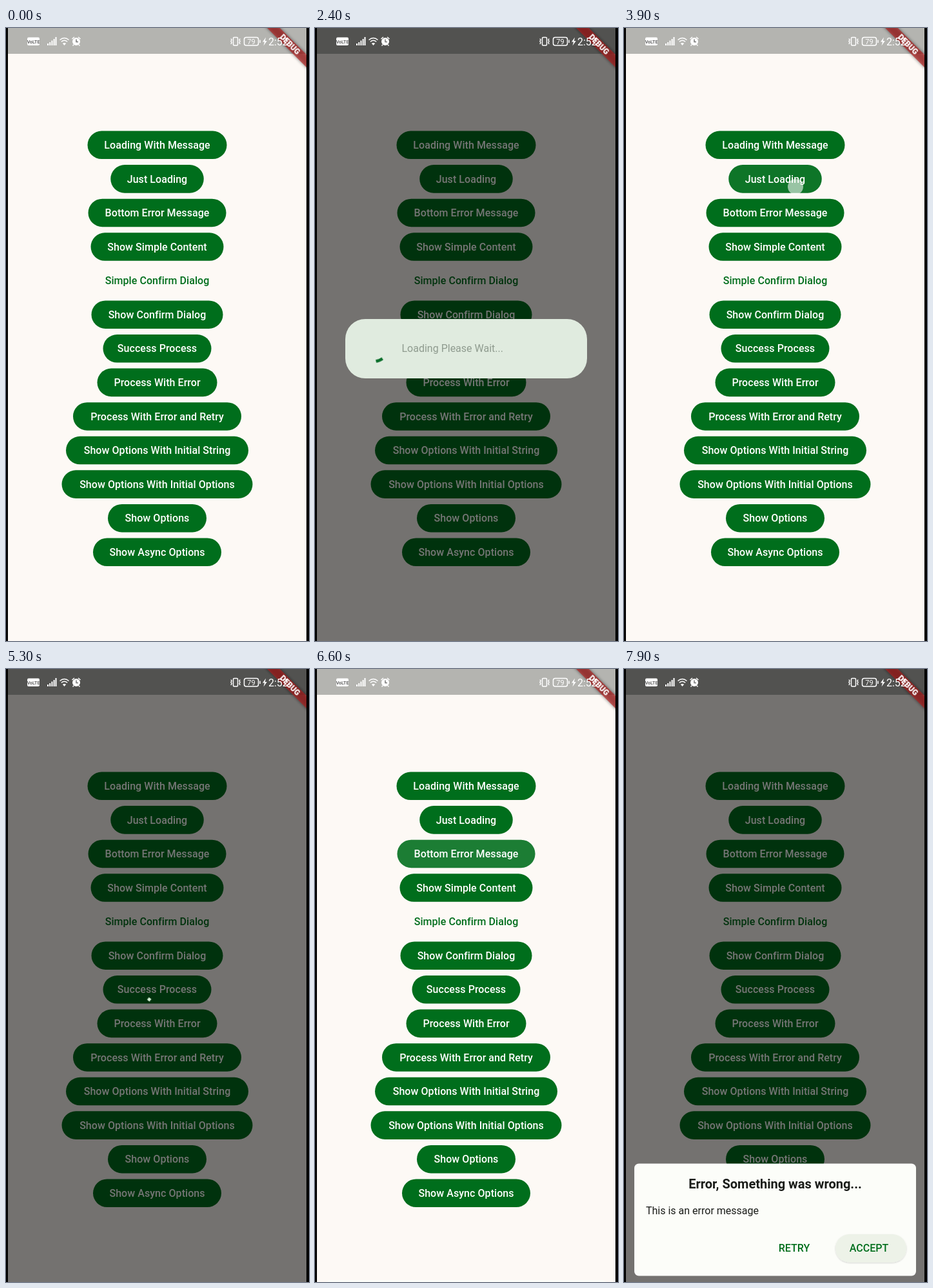
An HTML page that plays this animation: 470x950 px, repeating every 8 s.

```html
<!DOCTYPE html>
<html lang="en">
<head>
<meta charset="utf-8">
<title>Dialog demo</title>
<style>
  html, body { margin: 0; width: 100%; height: 100%; overflow: hidden; background: #000; }
  svg { display: block; width: 470px; height: 950px; }
  text { font: 400 16px Roboto, "Noto Sans", sans-serif; white-space: pre; }
  .mid { text-anchor: middle; }
  .label { font-weight: 500; letter-spacing: .05px; }
  .green { fill: #006e1c; }
  .white { fill: #fff; }
  .line { fill: none; stroke: #fff; stroke-width: 1.5; }
  .dark { stroke: #777; }

  /* Every part runs on an 8 s loop, shifted by its own start time --t. */
  .run { animation: 8s linear var(--t) infinite; }
  .scrim, .dialog, .sheet, .sheet-scrim, .touch, .ripple { opacity: 0; }
  .scrim { animation-name: scrim; }
  .dialog { animation-name: dialog; }
  .sheet { animation-name: sheet; }
  .sheet-scrim { animation-name: sheet-scrim; }
  .touch { animation-name: touch; }
  .ripple { animation-name: ripple; }
  .first { --t: 1280ms; }
  .second { --t: 3955ms; }
  .third { --t: 6600ms; }

  .spinner {
    fill: none; stroke-width: 4.7; stroke-linecap: square;
    stroke-dasharray: .1 360;
    transform-origin: 0 0;
    animation:
      spin 8s linear var(--t) infinite,
      arc 8s cubic-bezier(.4, 0, .2, 1) var(--t) infinite;
  }

  @keyframes scrim {
    0% { opacity: 0; animation-timing-function: ease; }
    1.875%, 25.61% { opacity: 1; animation-timing-function: cubic-bezier(.75, 0, .75, .9); }
    27.49%, 100% { opacity: 0; }
  }
  @keyframes dialog {
    0% { opacity: 0; animation-timing-function: ease-out; }
    1.875%, 25.61% { opacity: 1; animation-timing-function: ease-in; }
    27.49%, 100% { opacity: 0; }
  }
  @keyframes sheet {
    0% { opacity: 1; transform: translateY(184px); animation-timing-function: cubic-bezier(0, 0, .2, 1); }
    3.125%, 17.499% { opacity: 1; transform: translateY(0); }
    17.5%, 100% { opacity: 0; transform: translateY(0); }
  }
  @keyframes sheet-scrim {
    0% { opacity: 0; animation-timing-function: ease; }
    3.125%, 17.499% { opacity: 1; }
    17.5%, 100% { opacity: 0; }
  }
  @keyframes touch {
    0%, 1.3% { opacity: .58; }
    1.31%, 100% { opacity: 0; }
  }
  @keyframes ripple {
    0% { opacity: 0; }
    2%, 4.2% { opacity: .15; }
    6.5%, 100% { opacity: 0; }
  }
  @keyframes spin {
    from { rotate: 0deg; }
    to { rotate: 1836.26deg; }
  }
  /* The head runs ahead by 270 degrees, then the tail catches up. */
  @keyframes arc {
    0% { stroke-dasharray: .1 360; transform: rotate(-90deg); }
    8.331% { stroke-dasharray: 270 360; transform: rotate(-90deg); }
    16.6625% { stroke-dasharray: .1 360; transform: rotate(180deg); }
    24.994% { stroke-dasharray: 270 360; transform: rotate(180deg); }
    33.325%, 100% { stroke-dasharray: .1 360; transform: rotate(450deg); }
  }
</style>
</head>
<body>
<svg viewBox="0 0 470 950">
  <defs>
    <clipPath id="screen"><rect x="3" width="463" height="950"/></clipPath>
    <filter id="soft" x="-20%" y="-60%" width="140%" height="220%">
      <feDropShadow dx="0" dy="1" stdDeviation="1.2" flood-opacity=".18"/>
    </filter>
    <filter id="blur" x="-20%" y="-100%" width="140%" height="300%">
      <feGaussianBlur stdDeviation="2.5"/>
    </filter>
  </defs>

  <rect width="470" height="950"/>
  <g clip-path="url(#screen)">
    <rect width="470" height="950" fill="#fdf9f5"/>
    <rect width="470" height="40" fill="#b4b4b0"/>
    <g id="buttons"></g>

    <rect class="run scrim first" width="470" height="950" fill-opacity=".54"/>
    <g class="run dialog first">
      <rect x="47" y="451" width="375" height="92" rx="31" fill="#e0ebdf"/>
      <g transform="translate(92.5 497)">
        <circle class="spinner" r="19.5" pathLength="360" stroke="#0b6f2b"/>
      </g>
      <text x="134.5" y="502" fill="#8f9b8f">Loading Please Wait...</text>
    </g>

    <rect class="run scrim second" width="470" height="950" fill-opacity=".54"/>
    <g class="run dialog second">
      <g transform="translate(234.5 497)">
        <circle class="spinner" r="19.5" pathLength="360" stroke="#d8f3d8"/>
      </g>
    </g>

    <rect class="run sheet-scrim third" width="470" height="950" fill-opacity=".54"/>
    <g class="run sheet third">
      <rect x="16" y="766.5" width="437" height="174" rx="7" fill="#fcfdf9"/>
      <text class="mid" x="234.5" y="804.5" fill="#1a1c19" style="font-size:20px;font-weight:700">Error, Something was wrong...</text>
      <text x="34" y="845" fill="#1a1c19">This is an error message</text>
      <text class="mid label green" x="264" y="903">RETRY</text>
      <rect x="328" y="876" width="110" height="43.5" rx="21.75" fill="#edf2e8" filter="url(#soft)"/>
      <text class="mid label green" x="380" y="903">ACCEPT</text>
    </g>

    <g transform="translate(440.5 25.5) rotate(45)">
      <rect x="-60" y="-7" width="120" height="14" fill-opacity=".5" filter="url(#blur)"/>
      <rect x="-60" y="-7" width="120" height="14" fill="#b71c1c" fill-opacity=".63"/>
      <text class="mid white" y="4.3" style="font-size:12px;font-weight:900">DEBUG</text>
    </g>

    <g id="status">
      <rect class="white" x="33" y="14.5" width="19" height="12.5" rx="2"/>
      <text class="mid" x="42.5" y="23.8" fill="#666" style="font-size:7px;font-weight:700">VoLTE</text>
      <path class="line" style="stroke-width:2" d="M65 27v-3M68.2 27v-5M71.4 27v-7.5M74.6 27v-10M77.5 27v-13"/>
      <path class="line" d="M83.5 18.5q7-6 14 0M85.800 21.300q4.700-4 9.400 0"/>
      <path class="white" d="M90.5 27l-2.700-3.200q2.700-1.800 5.400 0z"/>
      <circle class="white" cx="109" cy="21" r="6"/>
      <path class="line" d="M102.500 17l3.500-3M115.500 17l-3.500-3M105 26l-1.500 1.500M113 26l1.500 1.500"/>
      <path class="line dark" d="M109 17.500v4h3"/>
      <rect class="line" x="352.500" y="14.500" width="7" height="12.500" rx="1.500"/>
      <path class="line" d="M349 16.500l1 2-1 2 1 2-1 2.500M363 16.500l-1 2 1 2-1 2 1 2.500"/>
      <rect class="line" x="369.500" y="14.500" width="22" height="12.500" rx="3"/>
      <path class="line" d="M394 18.500v4.500"/>
      <text class="mid white" x="380.500" y="25" style="font-size:11px">79</text>
      <path class="white" d="M403 14.500l-5 7h3l-1.500 6 5.300-7.500h-3z"/>
      <text class="white" x="407" y="26.500">2:52</text>
    </g>

    <circle class="run touch" style="--t:1175ms" cx="266" cy="192" r="12" fill="#fff"/>
    <circle class="run touch" style="--t:3840ms" cx="266" cy="246" r="12" fill="#fff"/>
    <circle class="run touch" style="--t:6480ms" cx="266" cy="297" r="12" fill="#fff"/>
  </g>
</svg>
<script>
  // [label, button width, time of the tap]; width 0 is a plain text button
  const items = [
    ["Loading With Message", 216, 1175],
    ["Just Loading", 144.5, 3840],
    ["Bottom Error Message", 214, 6480],
    ["Show Simple Content", 206],
    ["Simple Confirm Dialog", 0],
    ["Show Confirm Dialog", 204],
    ["Success Process", 168],
    ["Process With Error", 186],
    ["Process With Error and Retry", 261],
    ["Show Options With Initial String", 283],
    ["Show Options With Initial Options", 296],
    ["Show Options", 153],
    ["Show Async Options", 199]
  ];
  const midX = 234.5, firstY = 181.3, stepY = 52.58, pillHeight = 43.6;

  const pill = (y, width, attrs) =>
    `<rect x="${midX - width / 2}" y="${y - pillHeight / 2}" width="${width}" height="${pillHeight}" rx="${pillHeight / 2}" ${attrs}/>`;

  document.getElementById("buttons").innerHTML = items.map(([label, width, tap], i) => {
    const y = firstY + i * stepY;
    const body = width ? pill(y, width, 'class="green"') : "";
    const ripple = tap ? pill(y, width, `class="run ripple white" style="--t:${tap}ms"`) : "";
    return `${body}${ripple}<text class="mid label ${width ? "white" : "green"}" x="${midX}" y="${y + 5.7}">${label}</text>`;
  }).join("");
</script>
</body>
</html>
```
